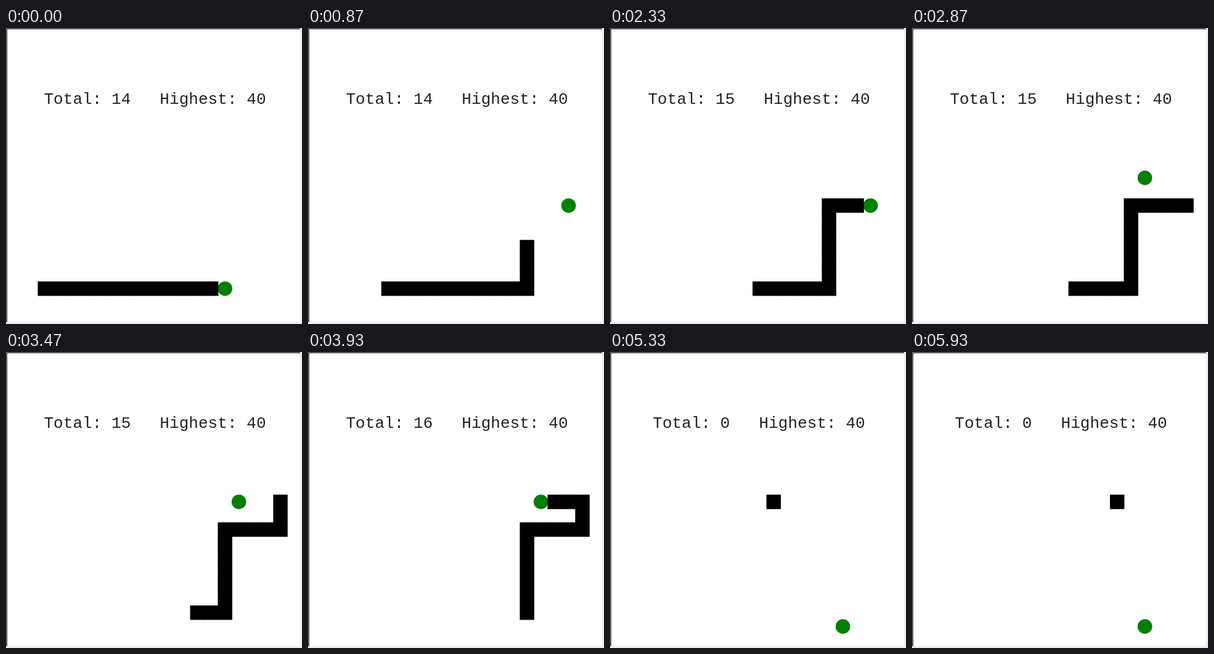
An HTML page with a canvas for the animation above (6.14 s loop, 480 by 480 pixels).

```html
<!DOCTYPE html>
<html lang="en">
<head>
<meta charset="utf-8">
<title>Snake</title>
<style>
  html, body { margin: 0; height: 100%; overflow: hidden; background: #fff; }
  canvas { display: block; }
</style>
</head>
<body>
<canvas id="stage" width="480" height="480"></canvas>
<script>
const ctx = document.getElementById('stage').getContext('2d');
const LOOP = 6140, RESET = 4930, RESTART = 5130, RESTART_PACE = 200;
const STEP = 22.46, SIZE = 23.4;

// Grid cells are { x, y } with y counted upwards; the head reaches each turn at its time.
const turns = [
  { time: -3400, x: 0, y: 0 },
  { time: 70, x: 13, y: 0 },
  { time: 1670, x: 13, y: 6 },
  { time: 2870, x: 17, y: 6 },
  { time: 3470, x: 17, y: 8 },
  { time: 3930, x: 15, y: 8 },
  { time: 4270, x: 14, y: 8 },
  { time: 4530, x: 14, y: 7 },
  { time: 4870, x: 16, y: 7 },
];
const foods = [{ x: 13, y: 0 }, { x: 16, y: 6 }, { x: 14, y: 8 }, { x: 14, y: -1 }];
const startLength = 13, startTotal = 13;

// Every cell the head visits, with its arrival time spread evenly between turns.
const path = [turns[0]];
for (let i = 1; i < turns.length; i++) {
  const a = turns[i - 1], b = turns[i];
  const count = Math.abs(b.x - a.x) + Math.abs(b.y - a.y);
  for (let n = 1; n <= count; n++) {
    const mix = key => a[key] + (b[key] - a[key]) * n / count;
    path.push({ time: mix('time'), x: Math.round(mix('x')), y: Math.round(mix('y')) });
  }
}

const foodSteps = foods.slice(0, -1).map(
  food => path.findIndex(cell => cell.x === food.x && cell.y === food.y));
const foodsReached = step => foodSteps.filter(s => s <= step).length;

function stateAt(t) {
  const head = path.filter(cell => cell.time <= t).length - 1;
  const eaten = foodsReached(head);
  if (t >= RESET) {
    const moved = Math.floor((t - RESTART) / RESTART_PACE);
    const x = 8 + Math.min(4, Math.max(0, moved));
    return { snake: [{ x, y: 8 }], food: foods[eaten], total: 0 };
  }
  return {
    snake: path.slice(head + 1 - startLength - eaten, head + 1),
    food: foods[eaten],
    total: startTotal + foodsReached(head + 1), // scores one cell before the food
  };
}

const cellLeft = cell => 51.5 + STEP * cell.x;
const cellTop = cell => 411 - STEP * cell.y;

function rect(color, x, y, w, h) {
  ctx.fillStyle = color;
  ctx.fillRect(x, y, w, h);
}

function drawFrame() {
  rect('#ececec', 0, 0, 480, 480);
  rect('#888', 0, 0, 477, 477);
  rect('#222', 1, 1, 476, 476);
  rect('#fff', 2, 2, 475, 475);
}

function drawScore(total) {
  ctx.font = '26.1px "Courier New", "Liberation Mono", monospace';
  ctx.textAlign = 'center';
  ctx.fillStyle = '#222';
  ctx.fillText(`Total: ${total}   Highest: 40`, 241.5, 122.5);
}

function drawFood(cell) {
  ctx.fillStyle = '#008000';
  ctx.beginPath();
  ctx.arc(cellLeft(cell) + SIZE / 2, cellTop(cell) + SIZE / 2, 11.8, 0, 2 * Math.PI);
  ctx.fill();
}

function render() {
  const { snake, food, total } = stateAt(performance.now() % LOOP);
  drawFrame();
  drawScore(total);
  drawFood(food);
  for (const cell of snake) rect('#000', cellLeft(cell), cellTop(cell), SIZE, SIZE);
  requestAnimationFrame(render);
}
render();
</script>
</body>
</html>
```
